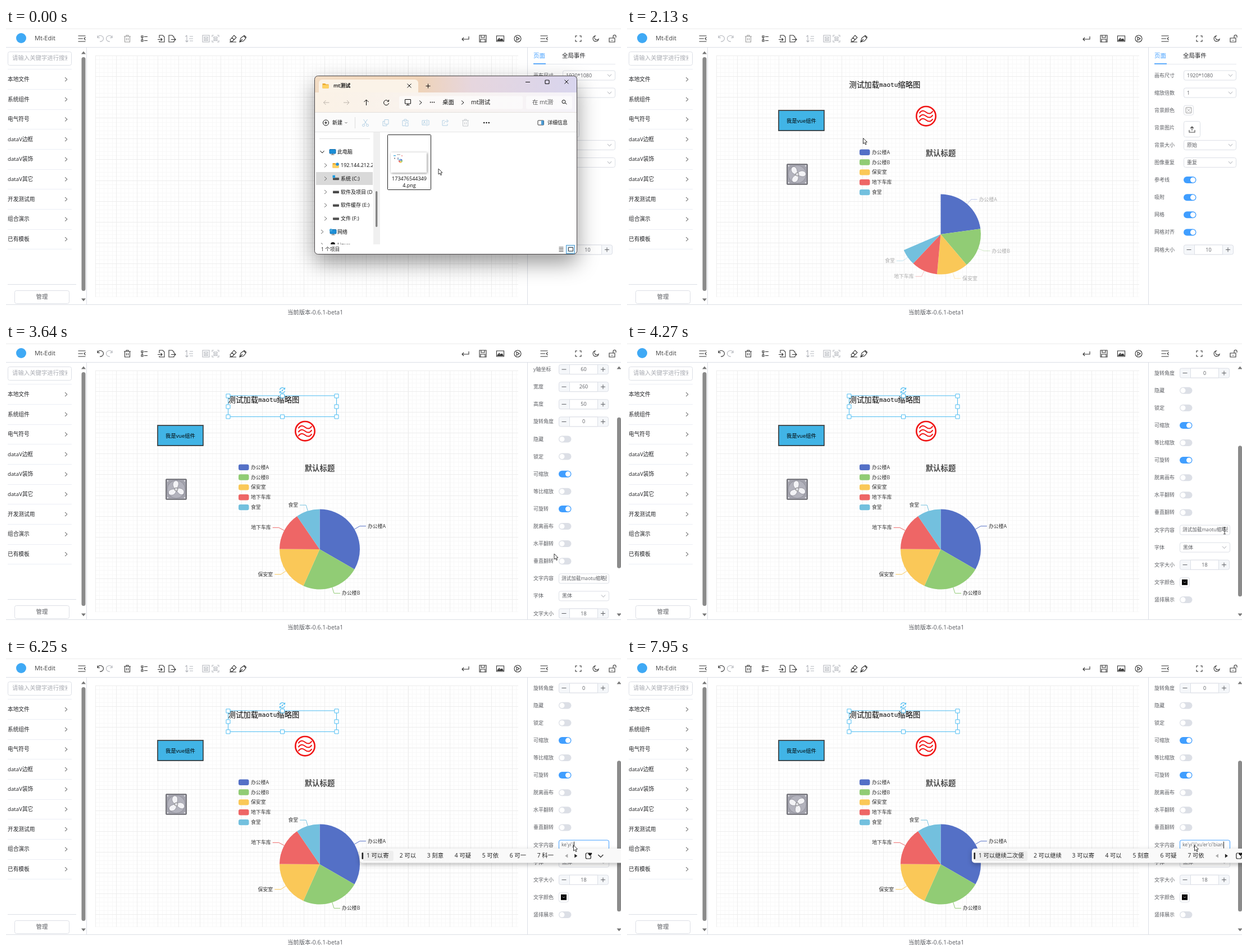
Write an HTML page with a canvas that moves like this. It is 1095 px wide and 512 px high and loops after 7990 ms.

```html
<!DOCTYPE html>
<html lang="zh">
<head>
<meta charset="utf-8">
<style>
html, body { margin: 0; width: 100%; height: 100%; overflow: hidden; background: #fff }
canvas { display: block }
</style>
</head>
<body>
<canvas id="stage" width="1095" height="512"></canvas>
<script>
const LOOP = 7990;
const c = document.getElementById('stage').getContext('2d');
const SANS = '"Open Sans","Noto Sans CJK SC","Noto Sans CJK",sans-serif';
const BLUE = '#409eff', INK = '#222326', GREY = '#5c5e63', PALE = '#b4b7bd', EDGE = '#dcdfe6';
const clamp = v => Math.max(0, Math.min(1, v));
const smooth = v => (v = clamp(v), v * v * (3 - 2 * v));

function text(s, x, y, size = 9, color = GREY, align = 'left', weight = 400, font = SANS) {
  c.font = `${weight} ${size}px ${font}`;
  c.fillStyle = color; c.textAlign = align; c.textBaseline = 'middle';
  c.fillText(s, x, y + .7);
}
function box(x, y, w, h, fill, stroke, r = 0, lw = 1) {
  c.beginPath(); c.roundRect(x, y, w, h, r);
  if (fill) { c.fillStyle = fill; c.fill(); }
  if (stroke) { c.strokeStyle = stroke; c.lineWidth = lw; c.stroke(); }
}
function path(d, x, y, stroke, lw = 1, fill) {
  c.save(); c.translate(x, y);
  const p = new Path2D(d);
  if (fill) { c.fillStyle = fill; c.fill(p); }
  if (stroke) { c.strokeStyle = stroke; c.lineWidth = lw; c.stroke(p); }
  c.restore();
}
function disc(x, y, r, fill, stroke, lw) { box(x - r, y - r, 2 * r, 2 * r, fill, stroke, r, lw); }
function clip(x, y, w, h, draw) {
  c.save(); c.beginPath(); c.rect(x, y, w, h); c.clip(); draw(); c.restore();
}
const hLine = (x1, x2, y, color) => box(x1, y, x2 - x1, 1, color);
const vLine = (x, y1, y2, color) => box(x, y1, 1, y2 - y1, color);

const RIGHT = 'M-2-3.5L2 0-2 3.5', DOWN = 'M-3.5-2L0 2 3.5-2', CROSS = 'M-3.5-3.5L3.5 3.5M3.5-3.5L-3.5 3.5';
const UNDO = 'M-5-5.5V-1.5H-1M-5-1.5A5.3 5.3 0 1 1-1 5';
const REDO = 'M5-5.5V-1.5H1M5-1.5A5.3 5.3 0 1 0 1 5';
const TRASH = 'M-6-4H6M-2-4V-6H2V-4M-4.5-4V6H4.5V-4M-1.5-1V3M1.5-1V3';
const MENU = 'M-6.5-5H6.5M-6.5 0H2M-6.5 5H6.5M6.5-2.5L4 0 6.5 2.5';
const HEADER_ICONS = [
  [135, MENU],
  [246, 'M-5-5h3v3h-3zM-5 2h3v3h-3zM0-3.5H6M0 3.5H6M-3.5-2V2'],
  [277, 'M-4-1V-6H2L5-3V6H-4V4M-7 1.5H1M-1.5-1L1 1.5-1.5 4'],
  [295, 'M4-1V-3L1-6H-5V6H4V4M-1 1.5H7M4.5-1L7 1.5 4.5 4'],
  [326, 'M-4-6V6M-6.5 3.5L-4 6-1.5 3.5M-6.5-3.5L-4-6M1-4H7M0 0H7M1 4H7', 1],
  [356, 'M-6-6H6V6H-6zM-3-3H3V-.5H-3zM-3 1.5H3V3.5H-3z', 1],
  [373, 'M-6-3V-6H-3M3-6H6V-3M6 3V6H3M-3 6H-6V3M-3-3H3V-.5H-3zM-3 1.5H3V3.5H-3z', 1],
  [404, 'M-5 2L2-6 6-2-1 5H-4zM-2-2L2 2M-6 6H6'],
  [422, 'M-6 6L-4-1 1-5 5-1 1 4zM-6 6L-1 1M2-6L6-2'],
  [818, 'M6-4V1H-6M-3-2L-6 1-3 4'],
  [849, 'M-6-6H6V6H-6zM-3-6V-2H3V-6M-4 6V1H4V6'],
  [880, 'M-6.5-5H6.5V5H-6.5zM-5 3L-2-1 1 2 3 0 5 3zM-5 3.5H5M-4 2.5H4M-3 1.5H-1M2 1.5H4'],
  [911, 'M6 0A6 6 0 1 1-6 0 6 6 0 1 1 6 0zM-2-3L3 0-2 3z'],
  [958, MENU],
  [1019, 'M-5-2V-5H-2M2-5H5V-2M5 2V5H2M-2 5H-5V2'],
  [1050, 'M-1-5A5 5 0 1 0 5 1 4 4 0 0 1-1-5z'],
  [1080, 'M-6-1H4V6H-6zM1-1V-4A2.5 2.5 0 0 1 6-4V-2M-1 2V4']
];

function drawShell(selected) {
  hLine(0, 1095, 1, '#ececec');
  hLine(0, 1095, 34, EDGE);
  disc(27, 18, 9, '#3fa9f5');
  text('Mt-Edit', 51, 18.5, 11, '#444');
  for (const [x, d, dim] of HEADER_ICONS) path(d, x, 19, dim ? PALE : '#333', 1.1);
  path(UNDO, 168, 19, selected ? '#333' : PALE, 1.1);
  path(REDO, 184, 19, PALE, 1.1);
  path(TRASH, 216, 19, selected ? '#333' : '#999', 1.1);

  vLine(143, 35, 493, EDGE);
  box(3.5, 42.5, 113, 24, '#fff', EDGE, 3);
  clip(11, 44, 98, 20, () => text('请输入关键字进行搜索', 11, 54, 10.4, '#a8abb2'));
  hLine(3, 117, 73, '#ebeef5');
  ['本地文件', '系统组件', '电气符号', 'dataV边框', 'dataV装饰', 'dataV其它', '开发测试用', '组合演示', '已有模板']
    .forEach((name, i) => {
      const y = 91.7 + i * 35.63;
      text(name, 3, y, 9.7, INK);
      path(RIGHT, 107, y, '#444', 1);
      hLine(3, 117, Math.round(y + 17.5), '#ebeef5');
    });
  hLine(3, 125, 457, EDGE);
  box(15.5, 468.5, 97, 23, '#fff', EDGE, 3);
  text('管理', 64, 479.5, 10.4, GREY, 'center');
  scrollbar(138, 52, 417);
  hLine(0, 1095, 493, EDGE);
  text('当前版本-0.6.1-beta1', 550.5, 507.3, 10.4, GREY, 'center');
}
function scrollbar(x, top, height) {
  path('M-4 2.5L0-2.5 4 2.5z', x, 44, null, 0, '#777');
  path('M-4-2.5L0 2.5 4-2.5z', x, 485, null, 0, '#777');
  box(x - 3.5, top, 7, height, '#8b8b8b', null, 3.5);
}
function drawGrid() {
  const step = 7.42;
  for (const [every, color] of [[1, '#f8f8f8'], [5, '#ededed']]) {
    for (let x = 159; x <= 912; x += step * every) vLine(Math.round(x), 49, 480, color);
    for (let y = 49; y <= 480; y += step * every) hLine(159, 912, Math.round(y), color);
  }
}

const SLICES = [
  ['办公楼A', 1048, '#5470c6'], ['办公楼B', 735, '#91cc75'], ['保安室', 580, '#fac858'],
  ['地下车库', 484, '#ee6666'], ['食堂', 300, '#73c0de']
];
function drawPie(age) {
  const cx = 558.5, cy = 368, r = 71.5, total = 3147, grow = smooth(age / 800);
  text('默认标题', 558.5, 224, 13.4, '#464646', 'center', 700);
  let start = -Math.PI / 2;
  SLICES.forEach(([name, value, color], i) => {
    const ly = 221.7 + i * 17.85;
    box(414, ly - 5.2, 18.5, 10.4, color, null, 3);
    text(name, 436, ly, 8.9, '#333');
    const end = start + value / total * Math.PI * 2 * grow, mid = (start + end) / 2;
    c.beginPath(); c.moveTo(cx, cy); c.arc(cx, cy, r, start, end); c.fillStyle = color; c.fill();
    start = end;
    c.globalAlpha = smooth((age - 350) / 350);
    const dx = Math.cos(mid), dy = Math.sin(mid), side = Math.sign(dx), x = cx + dx * (r + 11), y = cy + dy * (r + 11);
    path(`M${cx + dx * r} ${cy + dy * r}L${x} ${y}h${side * 11}`, 0, 0, color);
    text(name, x + side * 14, y, 8.9, '#333', side > 0 ? 'left' : 'right');
    c.globalAlpha = 1;
  });
}
function drawFan(age) {
  box(285, 243, 36, 36, '#a3a3ad', '#606066', 1, 1.6);
  disc(303, 261, 16, '#b3b3bd', '#92929c', 1);
  for (const [x, y] of [[288, 246], [318, 246], [288, 276], [318, 276]]) disc(x, y, 1.2, '#e0e0e4');
  c.save(); c.translate(303, 261); c.rotate(age / 1000 * Math.PI);
  for (let i = 0; i < 3; i++) {
    path('M0 0C-8-3-8-14-1-15.5 6-15 5-6 0 0z', 0, 0, '#8a8a94', .7, '#f3f3f6');
    c.rotate(Math.PI * 2 / 3);
  }
  c.restore();
  disc(303, 261, 3, '#dcdce2', '#777', .8);
}
function drawScene(age) {
  text('测试加载', 395.5, 101.5, 13.4, '#000');
  text('maotu', 449, 101.5, 11.15, '#000', 'left', 400, '"DejaVu Sans Mono",monospace');
  text('缩略图', 482.3, 101.5, 13.4, '#000');
  box(270, 147, 81, 36, '#41b4e6', '#222', 0, 1.4);
  path('M0 37V0H82', 269.8, 146.8, '#555', 1.2);
  text('我是vue组件', 310.5, 165.5, 9.3, '#000', 'center');
  disc(532.5, 157.2, 17.2, '#fff', '#f01414', 2.6);
  for (const y of [150.2, 157.2, 164.2]) path('M-12 2C-8-4-4-3 0 0S8 4 12-2', 532.5, y, '#f01414', 2);
  drawFan(age);
  drawPie(age);
}
function drawSelection() {
  const color = '#4fbdf2';
  box(395.5, 94, 193, 37.5, null, color);
  for (const x of [395.5, 492, 588.5]) for (const y of [94.5, 113.5, 131.5])
    if (x !== 492 || y !== 113.5) box(x - 3.5, y - 3.5, 7, 7, '#fff', color);
  path('M-4.5-1A4.6 4.6 0 0 1 4-2.5M4.5 1A4.6 4.6 0 0 1-4 2.5M4.5-5V-2H1.5M-4.5 5V2H-1.5', 492, 84.5, color, 1.2);
  disc(492, 84.5, 1.2, color);
}

function toggle(x, y, on) {
  box(x, y - 6, 22.5, 12, on ? BLUE : EDGE, null, 6);
  disc(x + (on ? 16.6 : 5.9), y, 4.6, '#fff');
}
function number(x, y, value) {
  box(x + .5, y - 8.5, 88, 17, '#f5f7fa', EDGE, 3);
  box(x + 19.5, y - 8.5, 50, 17, '#fff', EDGE);
  path('M-4 0H4', x + 9.5, y, GREY);
  path('M-4 0H4M0-4V4', x + 79, y, GREY);
  text(value, x + 44.5, y, 9, GREY, 'center');
}
function field(x, y, w, value, chevron) {
  box(x + .5, y - 8.5, w - 1, 17, '#fff', EDGE, 3);
  text(value, x + 6, y, 9);
  if (chevron) path(DOWN, x + w - 10.5, y, '#a8abb2');
}
function tabs(y, first, second) {
  text(first, 939, y, 10.4, BLUE);
  text(second, 990, y, 10.4, INK);
  hLine(939, 1085, y + 14, '#e4e7ed');
  box(939, y + 13, 22, 1.6, BLUE);
}
function drawPagePanel() {
  tabs(50, '页面', '全局事件');
  ['画布尺寸', '缩放倍数', '背景颜色', '背景图片', '背景大小', '图像重复', '参考线', '吸附', '网格', '网格对齐', '网格大小']
    .forEach((label, i) => {
      const y = 84.5 + i * 31.1;
      text(label, 939, y);
      const value = { 0: '1920*1080', 1: '1', 4: '原始', 5: '重复' }[i];
      if (value) field(991, y, 94, value, true);
      else if (i === 2) {
        box(991.5, y - 8.5, 17, 17, '#fff', EDGE, 3);
        box(995, y - 5, 10, 10, null, '#999', 1);
        path(CROSS, 1000, y, '#999', .8);
      } else if (i === 3) {
        box(991.5, 166.5, 29, 28, '#fff', EDGE, 3);
        path('M-5 1V5H5V1M0 2V-5M-3-2L0-5 3-2', 1006, 181, '#444', 1.1);
      } else if (i === 10) number(991, y, '10');
      else toggle(991, y, true);
    });
}
const ROWS = [
  ['标签名称', '文字'], ['图层编号', '1'], ['x轴坐标', 320], ['y轴坐标', 60], ['宽度', 260], ['高度', 50], ['旋转角度', 0],
  ['隐藏', false], ['锁定', false], ['可缩放', true], ['等比缩放', false], ['可旋转', true], ['脱离画布', false],
  ['水平翻转', false], ['垂直翻转', false], ['文字内容', 'content'], ['字体', '黑体'], ['文字大小', 18],
  ['文字颜色', 'color'], ['竖排展示', false]
];
function drawItemPanel(t) {
  const notch = at => smooth((t - at) / 150) * 77.7;
  const scroll = notch(3350) + notch(3523) + notch(3700);
  clip(929, 35, 166, 458, () => {
    tabs(50 - scroll, '属性', '全局事件');
    ROWS.forEach(([label, value], i) => {
      const y = 100.1 - scroll + i * 31.1;
      text(label, 939, y);
      if (typeof value === 'boolean') toggle(984, y, value);
      else if (typeof value === 'number') number(984, y, value);
      else if (value === 'content') drawContentField(y, t);
      else if (value === 'color') {
        box(984.5, y - 8.5, 17, 17, '#fff', EDGE, 3);
        box(988, y - 5, 10, 10, '#000');
        path('M-2-1L0 1 2-1', 993, y, '#ccc', .9);
      } else field(984, y, 90, value, value === '黑体');
    });
    scrollbar(1091.5, 48 + scroll * .58, 269);
  });
}

const PINYIN = "ke'yi'ji'xu'er'ci'bian";
const FIRST = '看 可 可以 可以 可以寄 可以及 可以继续 可以继续 可以继续 可以继续二 可以继续二 可以继续二次 可以继续二次 可以继续二次 可以继续二次 可以继续二次便'.split(' ');
const COMMON = '可以继续 可以寄 可以 刻意 可疑 可依 可一 科一 可'.split(' ');
const keysAt = t => t < 5660 ? 0 : Math.min(16, 1 + Math.floor((t - 5660) / 145));
function typed(n) {
  let i = 0;
  while (n > 0) if (PINYIN[i++] !== "'") n--;
  return PINYIN.slice(0, i);
}
function drawContentField(y, t) {
  const focused = t > 4330, cleared = t > 5550, value = cleared ? typed(keysAt(t)) : '测试加载maotu缩略图';
  box(984.5, y - 8.5, 89, 17, '#fff', focused ? BLUE : EDGE, 3);
  clip(988, y - 8, 82, 16, () => {
    text(value, 989, y, 8.6);
    if (focused && !cleared) {
      const left = 1069 - 80 * smooth((t - 4380) / 320);
      clip(left, y - 7, 1069 - left, 14, () => {
        box(989, y - 7, 80, 14, '#2b62c4');
        text(value, 989, y, 8.6, '#fff');
      });
    } else if (cleared) {
      c.font = `8.6px ${SANS}`;
      vLine(Math.round(989 + c.measureText(value).width), y - 6, y + 6, '#222');
    }
  });
}
function drawCandidates(n) {
  const left = n < 9 ? 630 : 614;
  const pool = n < 3 ? [...'课客刻科克颗棵'] : COMMON.slice(n < 5 ? 2 : n < 8 ? 1 : 0);
  const words = [...new Set([FIRST[n - 1], ...pool])].slice(0, 7);
  const pitch = w => 29.4 + 9.8 * w.length;
  c.save();
  c.shadowColor = 'rgba(0,0,0,.28)'; c.shadowBlur = 9; c.shadowOffsetY = 3;
  box(left, 340, 1130 - left, 25.5, '#f9f9f9', null, 5);
  c.restore();
  box(left + 5, 344, pitch(words[0]) - 4, 18, '#eeeeee', null, 3);
  box(left + 3.5, 347, 2.6, 12, '#222', null, 1.3);
  let x = left + 12;
  words.forEach((word, i) => {
    text(`${i + 1} ${word}`, x, 353, 10.3, '#222');
    x += pitch(word);
  });
  path('M2.5-3.5L-2.5 0 2.5 3.5z', x + 3, 353, null, 0, '#aaa');
  path('M-2.5-3.5L2.5 0-2.5 3.5z', x + 20, 353, null, 0, '#222');
  box(x + 37.5, 348, 9, 10, null, '#222', 2, 1.2);
  path('M0 3.5L-3.5 0A2 2 0 0 1 0-2 2 2 0 0 1 3.5 0z', x + 45, 350, '#f9f9f9', .8, '#111');
  path('M-4.5-2L0 2.5 4.5-2', x + 64, 353, '#222', 1.2);
}

const FILE_ICONS = [
  [640, 'M-3.5-6L2.5 3M3.5-6L-2.5 3M-1.5 4.5A2 2 0 1 1-5.5 4.5 2 2 0 1 1-1.5 4.5M5.5 4.5A2 2 0 1 1 1.5 4.5 2 2 0 1 1 5.5 4.5'],
  [676, 'M-2-5.5H5V2.5H-2zM-2-2.5H-5V5.5H2V2.5'],
  [711, 'M-2-4H-5V5.5H-1M2-4H5V-1M-2-6H2V-3H-2zM0 0H5V6H0z'],
  [747, 'M1-4H-6V4H1M4-4H6V4H4M2.5-6V6M-4 2.5L-2-2.5 0 2.5'],
  [782, 'M-1-4H-5V5H4V2M-2 2C-2-2 1-3 5-3M2.5-6L5.5-3 2.5 0'],
  [818, TRASH]
];
const DRIVES = ['192.144.212.2', '系统 (C:)', '软件及项目 (D:)', '软件缓存 (E:)', '文件 (F:)'];
function monitor(x, y) {
  box(x - 5.5, y - 4.5, 11, 7.5, '#1c8fd8', '#156ca8', 1);
  path('M0 3V5M-3 5H3', x, y, '#666');
}
function folder(x, y) {
  path('M-5.5-4H-1L1-2.5H5.5V4.5H-5.5z', x, y, null, 0, '#e9a82e');
  box(x - 5.5, y - 1.5, 11, 6, '#ffd262', null, 1);
}
function drawWindow(t) {
  const dark = '#0c0c0c', selected = t >= 950;
  c.save();
  c.shadowColor = 'rgba(0,0,0,.42)'; c.shadowBlur = 38; c.shadowOffsetY = 15;
  box(549.5, 85.5, 467, 318, '#fff', null, 6);
  c.restore();
  c.save();
  c.beginPath(); c.roundRect(549.5, 85.5, 467, 318, 6); c.clip();
  const bar = c.createLinearGradient(549, 0, 1017, 0);
  [[0, '#f2dcc4'], [.4, '#efd3b8'], [.6, '#e6d6de'], [1, '#d8d5ee']].forEach(s => bar.addColorStop(...s));
  box(549, 85, 468, 31, bar);
  const nav = c.createLinearGradient(549, 0, 1017, 0);
  nav.addColorStop(0, '#fbf2e6'); nav.addColorStop(1, '#f5f3f9');
  box(557, 92, 177, 30, '#fbf3e8', null, 6);
  box(549, 115, 468, 36, nav);
  box(549, 151, 468, 35, '#fbfbfb');
  hLine(549, 1017, 150, '#e4e0dc');
  hLine(549, 1017, 185, '#e6e6e6');

  folder(569, 103);
  text('mt测试', 583, 103.3, 9, dark, 'left', 600);
  path(CROSS, 718, 103, dark);
  path('M-4 0H4M0-4V4', 751.5, 103.5, dark);
  path('M-4 0H4', 929, 96.5, dark);
  box(960, 93, 7, 6.5, null, dark, 1, 1.1);
  path(CROSS, 998, 96, dark);

  const ARROW = 'M5 0H-5M-1-4L-5 0-1 4';
  path(ARROW, 570.5, 133, '#bbb3aa');
  path('M-5 0H5M1-4L5 0 1 4', 606, 133, '#bbb3aa');
  path('M0 5V-5M-4-1L0-5 4-1', 641.5, 133, dark);
  path('M4-2A4.5 4.5 0 1 0 4.5 1M4.5-5V-2H1.5', 677, 133, dark);
  box(700, 121.5, 220, 23, 'rgba(255,255,255,.6)', null, 3);
  box(926, 121.5, 82, 23, 'rgba(255,255,255,.6)', null, 3);
  path('M-5-5H5V2.5H-5zM0 2.5V5M-3 5H3', 715.5, 132.5, dark);
  path(RIGHT, 738, 133, dark); path(RIGHT, 813, 133, dark);
  for (const dx of [-3.3, 0, 3.3]) { disc(759 + dx, 132.5, .9, dark); disc(855.5 + dx * 1.3, 169, 1.2, dark); }
  text('桌面', 777, 132.7, 10.4, dark);
  text('mt测试', 828, 132.7, 10.4, dark);
  clip(930, 121, 45, 24, () => text('在 mt测试 中搜索', 937, 132.7, 10.4, '#555'));
  path('M2 .5A3 3 0 1 1-4 .5 3 3 0 1 1 2 .5M1 2.5L4.5 5', 994, 131, dark);

  path('M5 0A5 5 0 1 1-5 0 5 5 0 1 1 5 0M-2.5 0H2.5M0-2.5V2.5', 569.5, 169, dark);
  text('新建', 581, 169, 9, dark);
  path('M-2-1L0 1 2-1', 605.5, 169, '#666');
  vLine(621, 159, 179, '#ddd');
  for (const [x, d] of FILE_ICONS) {
    const color = !selected || x === 711 ? '#b3d0e4' : x === 818 ? '#444' : '#2878b0';
    path(d, x, 169, x === 818 && !selected ? '#c4c8cc' : color);
  }
  box(947, 165, 10.5, 8, '#fff', '#333', 1);
  box(953, 165, 4.5, 8, '#4b9ad4');
  text('详细信息', 964, 169, 9, dark);

  clip(551, 187, 102, 199, () => {
    hLine(558, 648, 197, '#ddd');
    path(DOWN, 563, 221, dark); monitor(581.5, 221); text('此电脑', 590, 221.3, 9, dark);
    box(552, 257, 101, 23, '#d9d9d9');
    DRIVES.forEach((name, i) => {
      const y = 245 + i * 23.75;
      path(RIGHT, 569, y, '#666');
      if (i) {
        box(582, y - 1.5, 11, 4, '#4a4a4a', null, 1);
        hLine(582, 593, y - 2.5, '#aaa');
        if (i === 1) box(581.5, y - 6, 4.5, 4.5, '#1c9be0');
      } else { folder(587, y); disc(590, y - 2, 2.8, '#2b8fd6'); }
      text(name, 596, y, 9, dark);
    });
    path(RIGHT, 563, 363.5, '#666'); monitor(582.5, 364); disc(578.5, 360.5, 2.6, '#42a5dc');
    text('网络', 590, 363.8, 9, dark);
    path(RIGHT, 563, 387, '#666'); disc(582, 386, 4, '#222'); text('Linux', 590, 387, 9, dark);
  });
  box(654, 186, 12, 200, '#f0f0f0');
  box(658, 291, 3.4, 64, '#858585', null, 1.7);

  box(679.5, 190.5, 77, 98, selected ? '#cce8ff' : t >= 620 ? '#e5f3ff' : '#fff', '#222', 1);
  c.save(); c.shadowColor = 'rgba(0,0,0,.45)'; c.shadowBlur = 4; c.shadowOffsetX = c.shadowOffsetY = 1;
  box(685, 222, 64, 36, '#fff'); c.restore();
  box(690, 227, 4, 1.6, '#52b1e0'); box(696, 225.5, 6, .8, '#777'); disc(705, 228, 1, '#e88');
  box(691, 231.5, 2, 2, '#888'); box(697, 231, 2, 4, '#9ac');
  SLICES.forEach(([, , color], i) => {
    c.beginPath(); c.moveTo(702.5, 237); c.arc(702.5, 237, 3.6, i * 1.257 - 1.57, i * 1.257 - .3);
    c.fillStyle = color; c.fill();
  });
  text('173476544349', 718, 269, 9, dark, 'center');
  text('4.png', 718, 281, 9, dark, 'center');

  text('1 个项目', 561, 394.7, 8.7, '#222');
  if (selected) text('选中 1 个项目  126 KB', 609, 394.7, 8.7, '#222');
  path('M-4-3.5H4M-4-1H4M-4 1.5H4M-4 4H4', 988.5, 394.5, '#555');
  box(997.5, 387.5, 15, 15, '#d9ecfa', '#4a9bd0');
  box(1001.5, 391.5, 8, 6.5, '#fff', '#333');
  c.restore();
  box(549.5, 85.5, 467, 318, null, '#4a4648', 6);
}

const POINTER = [
  [0, 770, 251], [590, 770, 251], [650, 735, 245], [950, 735, 245], [1430, 420.5, 196.5], [2420, 420.5, 196.5],
  [2760, 462, 103], [2930, 462, 103], [3200, 976, 376], [3860, 976, 376], [4020, 1000, 358], [4300, 1066, 334],
  [4380, 1066, 334], [4700, 986, 334], [5250, 986, 334], [5560, 1010.5, 334]
];
function drawPointer(t) {
  let i = POINTER.findIndex(p => p[0] > t);
  if (i < 0) i = POINTER.length;
  const a = POINTER[i - 1], b = POINTER[i] || a, k = smooth((t - a[0]) / (b[0] - a[0] || 1));
  const x = a[1] + (b[1] - a[1]) * k, y = a[2] + (b[2] - a[2]) * k;
  if ((t > 950 && t < 1430) || (t > 2790 && t < 2900)) disc(x, y, 9, 'rgba(255,235,0,.72)');
  if (t > 4250 && t < 5560) {
    if (t < 4700) path('M-2-6H2M0-6V6M-2 6H2', x, y, '#333', .9);
  } else if (t > 2620 && t < 2960) {
    path('M-1 8L-4 4.5C-5 3-3 2-2 3.5V-2C-2-3.5 0-3.5 0-2V2L4.5 3C6 3.5 6 5 5.5 7L4.5 11H0z', x + 1, y + 2, '#222', 1, '#fff');
  } else path('M0 0V10L2.3 8 4 11.6 5.6 10.9 4 7.3 7 7z', x, y, '#333', 1, '#fff');
}

function frame() {
  const t = performance.now() % LOOP, selected = t >= 2860, keys = keysAt(t);
  c.fillStyle = '#fff'; c.fillRect(0, 0, 1095, 512);
  drawShell(selected);
  drawGrid();
  if (t >= 1630) drawScene(t - 1630);
  if (selected) drawSelection();
  vLine(928, 35, 493, EDGE);
  if (selected) drawItemPanel(t); else drawPagePanel();
  if (t < 1930) drawWindow(t);
  if (keys) drawCandidates(keys);
  drawPointer(t);
  requestAnimationFrame(frame);
}
frame();
</script>
</body>
</html>
```
